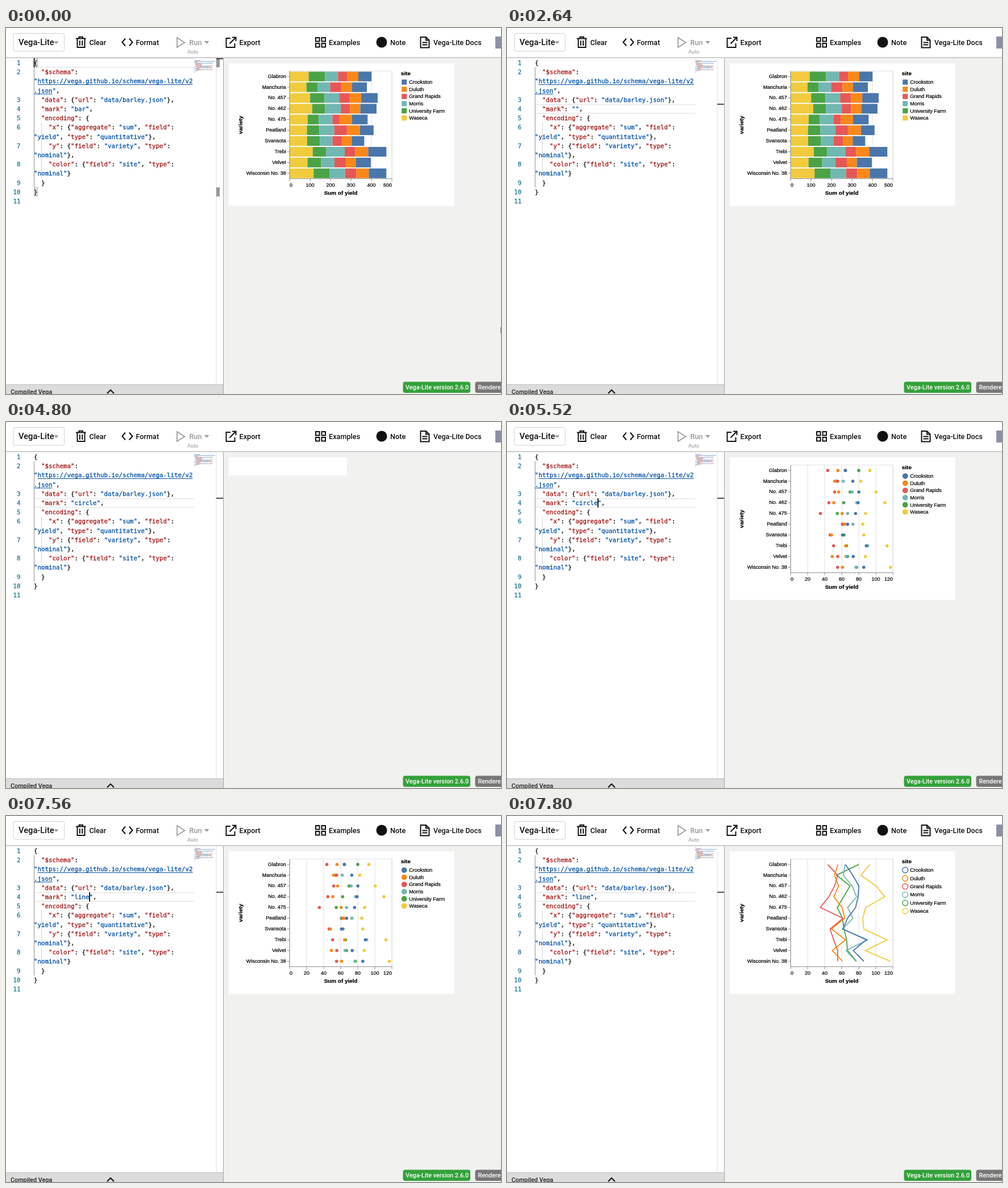
Animation, 871 px wide and 643 px high, one loop 8000 ms. Source, as an HTML page:

```html
<!DOCTYPE html>
<html lang="en">
<head>
<meta charset="utf-8">
<title>Chart editor</title>
<style>
  html, body { margin: 0; width: 100%; height: 100%; overflow: hidden; background: #fff; }
  svg { display: block; width: 871px; height: 643px; }
  text { white-space: pre; }
  .ui { font-family: Roboto, sans-serif; font-weight: 500; }
  .code { font: 10.8px "DejaVu Sans Mono", monospace; stroke-width: .3; }
  .chart { font: 10px "Liberation Sans", Arial, sans-serif; }
  .chart text { stroke: #000; stroke-width: .25; }
  .bold { font-size: 11px; font-weight: bold; }
  .icon { fill: none; stroke: #111; stroke-width: 2; }
</style>
</head>
<body>
<svg viewBox="0 0 871 643">
  <rect width="871" height="643" fill="#fff"/>
  <rect x="383" y="53" width="488" height="590" fill="#f1f1f0"/>
  <g id="chart" class="chart"></g>
  <g id="editor"></g>

  <path d="M370 53V627" stroke="#dedede"/>
  <g id="ruler"></g>
  <rect y="627" width="382" height="16" fill="#dcdcdc"/>
  <path d="M0 626.5H382" stroke="#bcbcbc"/>
  <path d="M382.5 53V643" stroke="#a4a4a4"/>

  <rect width="871" height="52" fill="#fff"/>
  <path d="M0 52H871" stroke="#bdbdbd" stroke-width="1.6"/>
  <rect x="13" y="9.5" width="89.500" height="31.500" rx="3" fill="#fff" stroke="#cfcfcf"/>
  <path d="M84 23.500h8.500l-4.250 4.500zM349 23h8.500l-4.250 4.800z" fill="#999"/>
  <g class="icon">
    <path d="M123 18.500H140.500M128.500 18V15.800H135V18M125.500 18.500V34H138.500V18.500M129.800 22V31M134.200 22V31"/>
    <path d="M210 18.500L204.500 25L210 31.500M217 18.500L222.500 25L217 31.500"/>
    <path d="M301 17L314.500 25.500L301 34Z" stroke="#999" stroke-width="1.700"/>
    <path d="M395 18H387.500V34H402.500V27M398 16.500H404.500V23M404 17L393.500 27.500"/>
    <path d="M545 17h6.500v6.500h-6.500zM555.500 17h6.500v6.500h-6.500zM545 27h6.500v6.500h-6.500zM555.500 27h6.500v6.500h-6.500z"/>
    <path d="M739 16H729.500V34.500H744.500V21.500ZM739 16V21.500H744.500M732.500 25.500H741.500M732.500 29.500H741.500"/>
    <path d="M178 642L184 636L190 642"/>
  </g>
  <circle cx="661" cy="25" r="9.500" fill="#111"/>
  <rect x="861" y="15" width="10" height="21" fill="#8b91a3"/>
  <rect x="698.500" y="621.500" width="118.500" height="19.500" rx="4" fill="#34a13b"/>
  <rect x="825.500" y="621.500" width="70" height="19.500" rx="4" fill="#777"/>
  <g id="labels" class="ui"></g>
  <g id="mouse"></g>
</svg>
<script>
const LOOP = 8000, FRAME = 120;
const LEFT = 49, CHAR = 6.502, ROW = 16.2;
const $ = id => document.getElementById(id);
const rect = (x, y, w, h, fill, more = '') =>
  `<rect x="${x}" y="${y}" width="${w}" height="${h}" fill="${fill}" ${more}/>`;
const path = (d, stroke, more = '') => `<path d="${d}" stroke="${stroke}" fill="none" ${more}/>`;
const text = (x, y, str, more = '') => `<text x="${x}" y="${y}" ${more}>${str}</text>`;
const each = (list, fn) => list.map(fn).join('');

// Toolbar and footer: x, baseline, size, colour, words
$('labels').innerHTML = each([
  [22, 30.2, 14.7, '#111', 'Vega-Lite'],
  [146.500, 29.5, 12.7, '#111', 'Clear'],
  [228.500, 29.5, 12.7, '#111', 'Format'],
  [322.500, 29.5, 12.7, '#999', 'Run'],
  [319, 45, 9.2, '#aaa', 'Auto'],
  [410.500, 29.5, 12.7, '#111', 'Export'],
  [568, 29.5, 12.7, '#111', 'Examples'],
  [676, 29.5, 12.7, '#111', 'Note'],
  [752, 29.5, 12.5, '#111', 'Vega-Lite Docs'],
  [8, 643, 10.8, '#222', 'Compiled Vega'],
  [703, 635, 10.8, '#fff', 'Vega-Lite version 2.6.0'],
  [830.500, 635, 10.8, '#fff', 'Renderer']
], ([x, y, size, fill, str]) => text(x, y, str, `font-size="${size}" fill="${fill}"`));

// Editor
const SOURCE = [
  '{',
  '  "$schema":',
  '"https://vega.github.io/schema/vega-lite/v2',
  '.json",',
  '  "data": {"url": "data/barley.json"},',
  '  "mark": "@",',
  '  "encoding": {',
  '    "x": {"aggregate": "sum", "field":',
  '"yield", "type": "quantitative"},',
  '    "y": {"field": "variety", "type":',
  '"nominal"},',
  '    "color": {"field": "site", "type":',
  '"nominal"}',
  '  }',
  '}'
];
const NUMBERED = [0, 1, 4, 5, 6, 7, 9, 11, 13, 14, 15];
const MARK_ROW = 5, MARK_COL = 11;
const colX = col => LEFT + col * CHAR;
const rowY = row => 53 + row * ROW;

function tokens(line) {
  return [...line.matchAll(/"[^"]*"(?=:)|^\.json"|"[^"]*"?|[^"]+/g)].map(m => {
    const str = m[0], isKey = line[m.index + str.length] === ':';
    const isString = /"/.test(str);
    return { str, col: m.index, fill: !isString ? '#111' : isKey ? '#a31515' : '#0451a5' };
  });
}

const codeLine = (line, row) => `<text x="${LEFT}" y="${rowY(row) + 12}">` +
  each(tokens(line), k => `<tspan fill="${k.fill}" stroke="${k.fill}">${k.str}</tspan>`) + '</text>';

const miniLine = (line, row) => each(tokens(line), k => {
  const word = k.str.trim();
  const start = k.col + k.str.length - k.str.trimStart().length;
  return word && rect(331 + start * .86, 55 + row * 1.6, word.length * .86, 1, k.fill, 'opacity=".5"');
});

// Time, word, caret offset in the word, selected
const EDITS = [
  [-400, 'bar', null],
  [1080, 'bar', 2],
  [1440, 'bar', 3, true],
  [2000, '', 0],
  [3240, 'c', 1],
  [3480, 'ci', 2],
  [3600, 'cir', 3],
  [3720, 'circ', 4],
  [3960, 'circl', 5],
  [4080, 'circle', 6],
  [6240, 'circle', 2],
  [6360, 'circle', 6, true],
  [6720, 'l', 1],
  [6840, 'li', 2],
  [6960, 'lin', 3],
  [7080, 'line', 4]
];

function drawEditor([, word, caret, selected], caretOn) {
  const atTop = caret === null;
  const row = atTop ? 0 : MARK_ROW;
  const lines = SOURCE.map(s => s.replace('@', word));
  const top = rowY(row);
  const bracket = y => rect(49.500, y + .5, 6, 15, '#e6e6e6', 'stroke="#b5b5b5"');
  let back = '', marks = '';

  if (selected) {
    back += rect(colX(MARK_COL), top, word.length * CHAR, ROW, '#add6ff');
    if (word === 'bar') {
      back += rect(colX(24), rowY(4), 3 * CHAR, ROW, '#dcecfa');
      marks += rect(370, 118, 6, 16, '#999');
    }
  } else {
    back += path(`M49 ${top + .8}H331M49 ${top + 15.8}H331`, '#e8e8e8', 'stroke-width="1.6"');
  }
  if (atTop) {
    back += bracket(53) + bracket(rowY(14));
    marks += rect(370, 53, 6, 16, '#999') + rect(370, 280, 6, 16, '#999');
  }
  marks += rect(370, atTop ? 53 : 133, 12, 1.7, '#333');

  const caretX = atTop ? LEFT : colX(MARK_COL + caret);
  $('editor').innerHTML = back +
    path('M49.500 69V280', '#929292') + path('M62.500 166V264', '#d3d3d3') +
    '<g class="code">' + each(lines, codeLine) +
    each(NUMBERED, r => text(25.500, rowY(r) + 12, NUMBERED.indexOf(r) + 1,
      'fill="#237893" stroke="#237893" text-anchor="end"')) + '</g>' +
    path(`M${colX(1)} 99.500H328.500M49 116H${colX(5)}`, '#0451a5') +
    each(lines, miniLine) +
    (caretOn ? rect(caretX - .3, top, 1.7, ROW, '#000') : '');
  $('ruler').innerHTML = marks;
}

// Chart, in its own units and scaled by .9
const SITES = ['Crookston', 'Duluth', 'Grand Rapids', 'Morris', 'University Farm', 'Waseca'];
const COLORS = ['#4a76ab', '#fa8819', '#e75757', '#71b7b2', '#4aa346', '#f1cb3d'];
const YIELDS = {
  'Glabron': [64.3, 55.5, 43.6, 63.9, 79.9, 92.9],
  'Manchuria': [72.9, 51.5, 55.1, 61.8, 53.9, 82.3],
  'No. 457': [80, 56.3, 51.6, 72.2, 69.7, 100.3],
  'No. 462': [79.1, 50.6, 44.8, 77.4, 62.2, 110.5],
  'No. 475': [76.2, 60.4, 34.9, 66.8, 54.7, 88],
  'Peatland': [66.8, 63.4, 61.5, 73.1, 60.8, 84.6],
  'Svansota': [61.1, 47.9, 46.3, 60.8, 62.6, 85.8],
  'Trebi': [88.8, 64.5, 50.4, 90.4, 65.6, 113.1],
  'Velvet': [73.4, 48.8, 55.3, 65, 66.7, 87.6],
  'Wisconsin No. 38': [85.8, 60.9, 55.1, 76.6, 77.3, 117]
};
const NAMES = Object.keys(YIELDS), ROWS = Object.values(YIELDS);
const PAINT_ORDER = [4, 5, 3, 0, 2, 1];
const W = 200, H = 210, BAND = 21;
const midY = i => (i + .5) * BAND;

const marksFor = {
  bar: x => each(ROWS, (vals, i) => {
    let sum = 0;
    return each([5, 4, 3, 2, 1, 0], s => {
      const bar = rect(x(sum), i * BAND + 1.05, x(vals[s]), BAND * .9, COLORS[s]);
      sum += vals[s];
      return bar;
    });
  }),
  circle: x => each(ROWS, (vals, i) => each(PAINT_ORDER, s =>
    `<circle cx="${x(vals[s])}" cy="${midY(i)}" r="3.1" fill="${COLORS[s]}"/>`)),
  line: x => each(PAINT_ORDER, s =>
    path('M' + ROWS.map((vals, i) => `${x(vals[s])} ${midY(i)}`).join('L'), COLORS[s], 'stroke-width="2"'))
};

const symbolFor = {
  bar: (y, c) => rect(219, y - 5, 10, 10, c),
  circle: (y, c) => `<circle cx="224" cy="${y}" r="5.4" fill="${c}"/>`,
  line: (y, c) => `<circle cx="224" cy="${y}" r="5.4" fill="#fff" stroke="${c}" stroke-width="1.7"/>`
};

function drawChart(mode) {
  if (mode === 'blank') {
    $('chart').innerHTML = rect(392, 62, 207.5, 32, '#fff');
    return;
  }
  const max = mode === 'bar' ? 500 : 120, step = mode === 'bar' ? 100 : 20;
  const x = v => v * W / max;
  const ticks = Array.from({ length: max / step + 1 }, (_, i) => i * step);
  const anchor = v => v === 0 ? 'start' : v === max ? 'end' : 'middle';
  const gap = mode === 'line' ? 16 : 14;

  $('chart').innerHTML = rect(392, 62, 396.5, 250.5, '#fff') +
    '<g transform="translate(499.1 75.7) scale(.9)">' +
    rect(0, 0, W, H, 'none', 'stroke="#ddd"') +
    each(ticks, v => path(`M${x(v)} 0V${H}`, '#ddd') + path(`M${x(v)} ${H}v5`, '#888') +
      text(x(v), H + 15.5, v, `text-anchor="${anchor(v)}"`)) +
    marksFor[mode](x) +
    path(`M0 0V${H}H${W}`, '#888') +
    each(NAMES, (name, i) => path(`M0 ${midY(i)}h-5`, '#888') +
      text(-7, midY(i) + 2.8, name, 'text-anchor="end"')) +
    text(W / 2, 241, 'Sum of yield', 'class="bold" text-anchor="middle"') +
    text(0, 0, 'variety', 'class="bold" text-anchor="middle" transform="translate(-92 105) rotate(-90)"') +
    text(217.5, 8.5, 'site', 'class="bold"') +
    each(SITES, (site, i) => symbolFor[mode](21.5 + i * gap, COLORS[i]) +
      text(233.5, 25 + i * gap, site)) + '</g>';
}

const CHARTS = [[0, 'bar'], [4680, 'blank'], [4920, 'circle'], [7680, 'blank'], [7800, 'line']];

// Pointer: time, x, y
const POINTER = [[0, 870, 524], [360, 265, 157], [600, 265, 157], [1080, 132, 142], [LOOP, 132, 142]];
const pointerShown = t => t < 2000 || (t >= 6120 && t < 6720);

function drawPointer(t) {
  if (!pointerShown(t)) {
    $('mouse').innerHTML = '';
    return;
  }
  const i = POINTER.findIndex(p => p[0] > t);
  const [t0, x0, y0] = POINTER[i - 1], [t1, x1, y1] = POINTER[i];
  const u = (t - t0) / (t1 - t0), k = u * u * (3 - 2 * u);
  const x = x0 + (x1 - x0) * k, y = y0 + (y1 - y0) * k;
  const beam = 'M-3.500 -7Q0 -7 0 -4.500Q0 -7 3.500 -7M0 -5V5M-3.500 7Q0 7 0 4.500Q0 7 3.500 7M-2 2.500H2';
  $('mouse').innerHTML = `<g transform="translate(${x} ${y})">` + (x > 382
    ? '<path d="M0 0V13L3 10.500L5 15L7 14L5 9.800H9Z" fill="#111" stroke="#fff" stroke-width=".8"/>'
    : path(beam, '#fff', 'stroke-width="2.6"') + path(beam, '#222', 'stroke-width="1.3"')) + '</g>';
}

const latest = (list, t) => list.filter(e => e[0] <= t).pop();
const start = performance.now();
let shown = {};

function refresh(key, value, draw) {
  if (shown[key] === value) return;
  shown[key] = value;
  draw();
}

function tick(now) {
  const time = Math.max(0, now - start) % LOOP;
  const t = Math.min(7800, Math.floor(time / FRAME) * FRAME);
  const edit = latest(EDITS, t);
  const caretOn = Math.floor((t - edit[0]) / 500) % 2 === 0;
  const mode = latest(CHARTS, t)[1];
  refresh('editor', edit[0] + ' ' + caretOn, () => drawEditor(edit, caretOn));
  refresh('chart', mode, () => drawChart(mode));
  refresh('mouse', t, () => drawPointer(t));
  requestAnimationFrame(tick);
}
tick(start);
</script>
</body>
</html>
```
